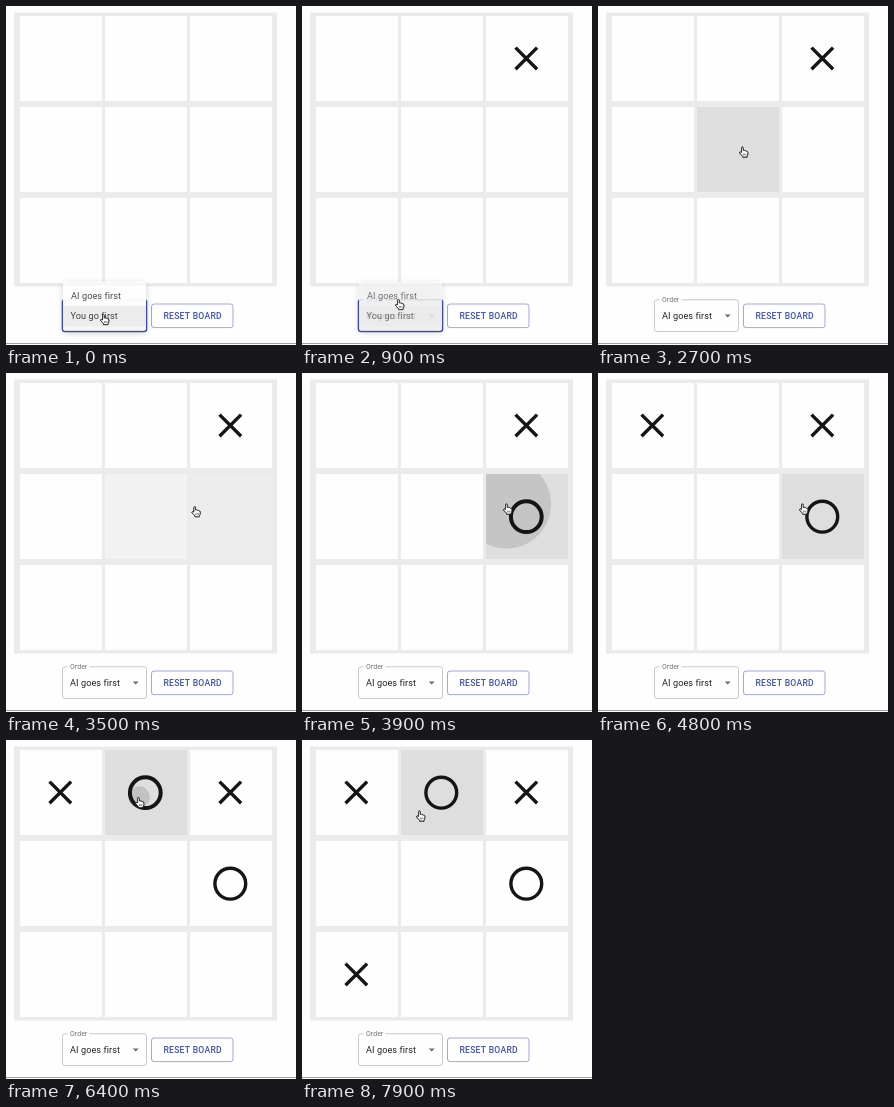
Animation, 290 px wide and 339 px high, one loop 8000 ms. Source, as an HTML page with a canvas:

```html
<!DOCTYPE html>
<html lang="en">
<head>
<meta charset="utf-8">
<title>Noughts and crosses</title>
<style>
  html, body { margin: 0; height: 100%; overflow: hidden; background: #fefefe; }
  canvas { display: block; }
</style>
</head>
<body>
<canvas id="stage" width="290" height="339"></canvas>
<script>
const ctx = document.getElementById('stage').getContext('2d');
const LOOP = 8000;
const INK = 'rgba(0,0,0,.87)';
const BLUE = [63, 81, 181];
const COLS = [14, 99, 184], ROWS = [10, 101, 192];
const CELL_W = 82, CELL_H = 85;

// Pointer waypoints: time, left, top
const PATH = [
  [0, 94, 308], [300, 94, 308], [650, 93, 293], [1200, 93, 293],
  [1400, 120, 293], [1600, 105, 290.5], [2300, 105, 290.5],
  [2400, 118, 240], [2500, 138, 172], [2700, 141, 140.5], [3220, 141, 140.5],
  [3600, 201, 130.5], [5420, 201, 130.5], [5700, 190, 116],
  [5800, 162, 80.5], [6250, 129, 57], [7890, 129, 57], [7891, 114, 70.5]
];
// Column, row, enter, leave
const HOVERS = [[1, 2, 2350, 2480], [1, 1, 2470, 3400], [2, 1, 3420, 5790], [1, 0, 5800, 9000]];
// Mark, column, row, appears
const MARKS = [['X', 2, 0, 800], ['O', 2, 1, 3750], ['X', 0, 0, 4750], ['O', 1, 0, 6350], ['X', 0, 2, 7350]];
const RIPPLES = [
  { col: 2, row: 1, x: 204.5, y: 131, radius: 83, start: 3700, release: 3850 },
  { col: 1, row: 0, x: 133, y: 57, radius: 70, start: 6285, release: 6500 }
];

const clamp = v => Math.max(0, Math.min(1, v));
const progress = (t, start, length) => clamp((t - start) / length);
const mix = (a, b, k) => a + (b - a) * k;

// cubic-bezier(.4, 0, .2, 1)
function standardEase(p) {
  let lo = 0, hi = 1;
  for (let i = 0; i < 14; i++) {
    const u = (lo + hi) / 2, v = 1 - u;
    if (1.2 * v * v * u + 0.6 * v * u * u + u ** 3 < p) lo = u; else hi = u;
  }
  return lo * lo * (3 - 2 * lo);
}

function rect(x, y, w, h, color) {
  ctx.fillStyle = color;
  ctx.fillRect(x, y, w, h);
}

function text(str, x, y, size, color, weight = 400, spacing = 0.08) {
  ctx.font = `${weight} ${size}px Roboto, sans-serif`;
  ctx.letterSpacing = spacing + 'px';
  ctx.fillStyle = color;
  ctx.fillText(str, x, y);
}

function roundBox(x, y, w, h, r) {
  ctx.beginPath();
  ctx.roundRect(x, y, w, h, r);
}

function drawMark(kind, col, row, width) {
  const x = COLS[col] + 40.3, y = ROWS[row] + 42.4;
  ctx.strokeStyle = '#151515';
  ctx.lineWidth = width;
  ctx.beginPath();
  if (kind === 'O') {
    ctx.arc(x, y + 0.3, 15.4, 0, 7);
  } else {
    const d = 10.8;
    ctx.moveTo(x - d, y - d); ctx.lineTo(x + d, y + d);
    ctx.moveTo(x + d, y - d); ctx.lineTo(x - d, y + d);
  }
  ctx.stroke();
}

function drawRipple(r, t) {
  const fade = 1 - progress(t, r.release, 550);
  if (t < r.start || !fade) return;
  ctx.save();
  ctx.beginPath();
  ctx.rect(COLS[r.col], ROWS[r.row], CELL_W, CELL_H);
  ctx.clip();
  ctx.beginPath();
  ctx.arc(r.x, r.y, r.radius * standardEase(progress(t, r.start, 550)), 0, 7);
  ctx.fillStyle = `rgba(0,0,0,${0.125 * fade})`;
  ctx.fill();
  ctx.restore();
}

function drawBoard(t) {
  rect(8, 6.5, 263, 274, '#ebebeb');
  for (const x of COLS) for (const y of ROWS) rect(x, y, CELL_W, CELL_H, '#fefefe');
  for (const [c, r, enter, leave] of HOVERS) {
    const level = standardEase(progress(t, enter, 220)) * (1 - standardEase(progress(t, leave, 250)));
    rect(COLS[c], ROWS[r], CELL_W, CELL_H, `rgba(0,0,0,${0.125 * level})`);
  }
  RIPPLES.forEach(r => drawRipple(r, t));
  for (const [kind, c, r, at] of MARKS) {
    if (t >= at) drawMark(kind, c, r, kind === 'O' && t < at + 400 ? 4 : 3.4);
  }
}

function drawSelect(t) {
  const blur = progress(t, 2040, 160);
  const tint = grey => `rgb(${BLUE.map(c => mix(c, grey, blur))})`;
  roundBox(56.5, 293.8, 84, 31.7, 2.5);
  ctx.fillStyle = `rgba(0,0,0,${0.06 * (1 - blur)})`;
  ctx.fill();
  ctx.strokeStyle = tint(196);
  ctx.lineWidth = mix(1.6, 0.9, blur);
  ctx.stroke();
  rect(61.5, 292, 22, 3.2, '#fefefe');
  text('Order', 64, 296.4, 6.9, tint(115));
  text(t < 800 ? 'You go first' : 'AI goes first', 64, 313.1, 9.15, INK);

  ctx.fillStyle = 'rgba(0,0,0,.58)';
  const flip = t < 800 ? -1 : 1;
  ctx.beginPath();
  ctx.moveTo(126.7, 310 - 1.5 * flip);
  ctx.lineTo(132.7, 310 - 1.5 * flip);
  ctx.lineTo(129.7, 310 + 1.5 * flip);
  ctx.fill();
}

function drawButton() {
  roundBox(145.5, 298, 81.5, 23.6, 2.5);
  ctx.strokeStyle = 'rgba(63,81,181,.55)';
  ctx.lineWidth = 0.9;
  ctx.stroke();
  text('RESET BOARD', 157.4, 313, 8.6, '#3f51b5', 500, 0.26);
}

function drawMenu(t) {
  const alpha = mix(0.82, 1, progress(t, 0, 120)) * (1 - progress(t, 800, 260));
  if (!alpha) return;
  ctx.save();
  ctx.globalAlpha = alpha;
  ctx.shadowColor = 'rgba(0,0,0,.22)';
  ctx.shadowBlur = 7;
  ctx.shadowOffsetY = 2;
  roundBox(57, 275.5, 83, 49.2, 2.5);
  ctx.fillStyle = '#fff';
  ctx.fill();
  ctx.shadowColor = 'transparent';
  const overFirst = t > 480;
  rect(57, 279.6, 83, 20.2, overFirst ? '#f2f2f2' : '#fff');
  rect(57, 299.8, 83, 20.2, '#ebebeb');
  text('AI goes first', 65, 293, 9.15, INK);
  text('You go first', 64.5, 313.1, 9.15, INK);
  ctx.restore();
}

const HAND = new Path2D('M2.6 6V1.4Q2.6.5 3.4.5T4.2 1.4V4Q5.3 3.4 5.8 4.3Q6.9 3.8 7.3 4.8Q8.8 4.5 8.8 6V7.6Q8.6 9 8 9.5V10.6H3.6V9.8L.7 6.6Q.3 5.6 1.2 5.5Z');
const ARROW = new Path2D('M.5 .3V8.2L2.3 6.6 3.5 9.3 4.8 8.7 3.6 6.2H6Z');

function drawPointer(t) {
  let i = PATH.length - 1;
  while (PATH[i][0] > t) i--;
  const a = PATH[i], b = PATH[i + 1] || a;
  const k = a === b ? 0 : (t - a[0]) / (b[0] - a[0]);
  const arrow = t >= 1500 && t < 2350;
  ctx.save();
  ctx.translate(mix(a[1], b[1], k), mix(a[2], b[2], k));
  ctx.lineWidth = 0.9;
  ctx.lineJoin = 'round';
  ctx.strokeStyle = arrow ? '#fff' : '#222';
  ctx.fillStyle = arrow ? '#111' : '#fff';
  const shape = arrow ? ARROW : HAND;
  ctx.stroke(shape);
  ctx.fill(shape);
  if (!arrow) {
    ctx.lineWidth = 0.8;
    ctx.stroke(shape);
    ctx.lineWidth = 0.5;
    ctx.stroke(new Path2D('M4.4 7V9M5.7 7V9M7 7V9'));
  }
  ctx.restore();
}

function draw(now) {
  const t = now % LOOP;
  rect(0, 0, 290, 339, '#fefefe');
  drawBoard(t);
  drawSelect(t);
  drawButton();
  drawMenu(t);
  rect(0, 337, 290, 1, '#a0a0a0');
  drawPointer(t);
}

const begin = performance.now();
function tick() {
  draw(performance.now() - begin);
  requestAnimationFrame(tick);
}
tick();
</script>
</body>
</html>
```
